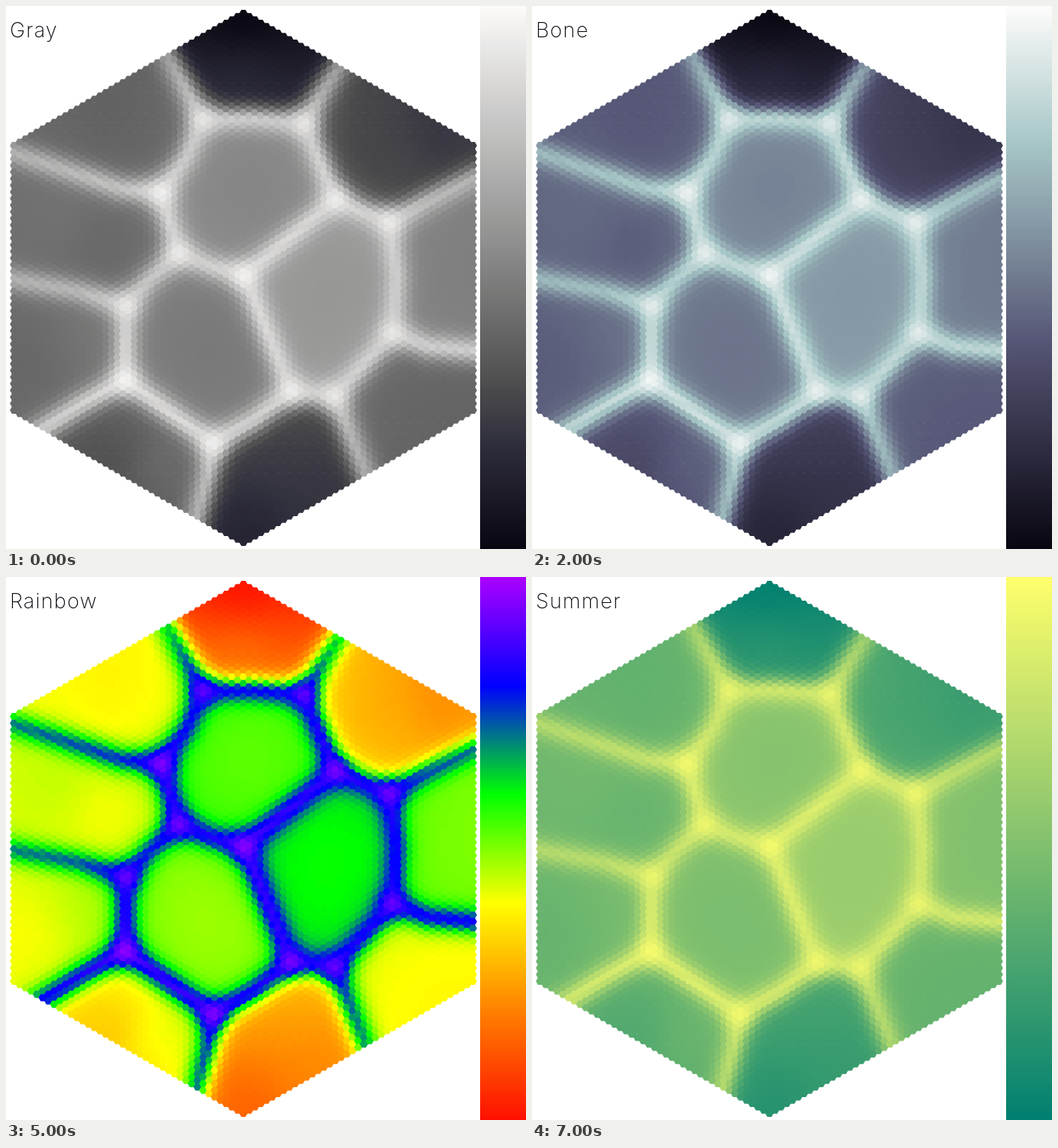
Animation, 680 px wide and 711 px high, one loop 8000 ms. Source, as an HTML page with a canvas:

```html
<!DOCTYPE html>
<html lang="en">
<head>
<meta charset="utf-8">
<title>Colour maps</title>
<style>
  html, body { margin: 0; width: 680px; height: 711px; overflow: hidden; background: #fff; }
  canvas, svg { position: absolute; left: 0; top: 0; display: block; }
  text { font: 200 27px Inter, "Open Sans", sans-serif; letter-spacing: 1.2px; fill: #0a0912; }
</style>
</head>
<body>
<canvas id="map" width="680" height="711"></canvas>
<svg width="680" height="711"><text id="label" x="5" y="41"></text></svg>
<script>
const STEP = 1000, SIDE = 40, R = 5, CX = 310.5, CY = 356;
const ctx = document.getElementById('map').getContext('2d');
const label = document.getElementById('label');

// Each map: name, then colour stops from low to high.
const MAPS = [
  ['Gray', [0, '08060f'], [0.18, '2c2b3a'], [0.3, '4c4c4e'], [0.4, '666666'], [1, 'fcfbfa']],
  ['Autumn', [0, 'ff0000'], [1, 'ffff00']],
  ['Bone', [0, '080610'], [0.375, '545474'], [0.75, 'a7c7c7'], [1, 'fdfcfb']],
  ['Jet', [0, '000080'], [0.125, '0000ff'], [0.375, '00ffff'], [0.625, 'ffff00'], [0.875, 'ff0000'], [1, '800000']],
  ['Winter', [0, '0000ff'], [1, '00ff80']],
  ['Rainbow', [0, 'ff1000'], [0.2, 'ff8000'], [0.4, 'ffff00'], [0.6, '00ff00'], [0.8, '0000ff'], [1, 'aa00ff']],
  ['Ocean', [0, '0a0910'], [0.1, '080818'], [0.2, '000033'], [0.333, '000055'], [0.667, '0080aa'], [1, 'fcfcfc']],
  ['Summer', [0, '008070'], [1, 'ffff6c']]
];

// Ridge points: x, y, height. Capitals are junctions.
const P = {
  B: [258, 149, .82], C: [390, 154, .82], D: [203, 245, .86], E: [226, 324, .84],
  F: [431, 254, .85], G: [502, 284, .84], H: [506, 428, .83], I: [430, 511, .83],
  J: [373, 504, .85], K: [312, 353, .87], L: [157, 393, .83], M: [156, 490, .88],
  N: [271, 573, .86],
  a: [204, 52, .6], b: [442, 70, .6], c: [416, 110, .68], d: [-2, 189, .7],
  e: [150, 239, .77], f: [622, 221, .7], g: [550, 257, .75], h: [622, 453, .82],
  i: [552, 446, .82], j: [475, 624, .67], k: [446, 550, .73], l: [246, 684, .68],
  m: [264, 615, .75], n: [40, 560, .82], o: [100, 521, .83], p: [-2, 356, .7],
  q: [95, 374, .73], r: [189, 358, .78], s: [511, 355, .82], t: [322, 148, .81],
  u: [236, 199, .8], v: [268, 341, .83], w: [325, 542, .83]
};
const PATHS = 'aB BtC Ccb BuD Ded DE CF FG Ggf GsH Hih HI Ikj IJ JK KF EvK ErL Lqp LM Mon MN NwJ Nml';
const ridges = PATHS.split(' ').map(w =>
  [...w].slice(1).map((c, i) => [P[w[i]], P[c]]));
const edges = ridges.flat();
const peaks = Object.keys(P).filter(k => k < 'a').map(k => P[k]);

// Levels inside the basins: x, y, value.
const LEVELS = [
  [310, 5, 0], [310, 105, .14], [490, 190, .26], [575, 165, .22], [440, 130, .28],
  [140, 150, .38], [60, 175, .4], [60, 270, .44], [148, 318, .39], [25, 475, .4],
  [110, 425, .44], [135, 595, .31], [205, 600, .4], [385, 580, .23], [310, 700, .14],
  [420, 640, .21], [535, 550, .39], [590, 350, .5], [320, 235, .52], [420, 380, .59],
  [260, 450, .47]
];

const side = (a, b, c) => (b[0] - a[0]) * (c[1] - a[1]) - (b[1] - a[1]) * (c[0] - a[0]);
const crosses = (a, b, c, d) =>
  side(a, b, c) * side(a, b, d) < 0 && side(c, d, a) * side(c, d, b) < 0;

function floorAt(p) {
  let sum = 0, total = 0, best = 1e9, near = 0;
  for (const q of LEVELS) {
    const d2 = (q[0] - p[0]) ** 2 + (q[1] - p[1]) ** 2;
    if (d2 < best) { best = d2; near = q[2]; }
    if (edges.some(([a, b]) => crosses(p, q, a, b))) continue;
    const w = 1 / (d2 + 600);
    sum += w * q[2];
    total += w;
  }
  return total ? sum / total : near;
}

// Distance to a ridge line and its height at the closest point.
function closest(ridge, x, y) {
  let dist = 1e9, height = 0;
  for (const [a, b] of ridge) {
    const dx = b[0] - a[0], dy = b[1] - a[1];
    const t = Math.max(0, Math.min(1, ((x - a[0]) * dx + (y - a[1]) * dy) / (dx * dx + dy * dy)));
    const d = Math.hypot(x - a[0] - t * dx, y - a[1] - t * dy);
    if (d < dist) { dist = d; height = a[2] + (b[2] - a[2]) * t; }
  }
  return [dist, height];
}

function valueAt(x, y) {
  const base = floorAt([x, y]);
  let gap = 1, sum = 0, total = 1e-9;
  for (const ridge of ridges) {
    const [d, h] = closest(ridge, x, y);
    const f = .9 * Math.exp(-((d / 16.5) ** 1.75)) + .1 * Math.exp(-d / 28);
    gap *= 1 - f;
    sum += f * h;
    total += f;
  }
  let v = base + (sum / total - base) * (1 - gap);
  for (const q of peaks) {
    const d = Math.hypot(x - q[0], y - q[1]);
    v += .09 * Math.exp(-((d / 13) ** 2));
  }
  return Math.max(0, Math.min(1, v));
}

const cells = [];
for (let k = -SIDE; k <= SIDE; k++) {
  const n = 2 * SIDE + 1 - Math.abs(k);
  for (let j = 0; j < n; j++) {
    const x = CX + 1.5 * R * k, y = CY + (j - (n - 1) / 2) * Math.sqrt(3) * R;
    cells.push([x, y, valueAt(x, y)]);
  }
}

const rgb = hex => [0, 2, 4].map(i => parseInt(hex.slice(i, i + 2), 16));

function shade(stops, v) {
  let i = 1;
  while (i < stops.length - 1 && v > stops[i][0]) i++;
  const [p, lo] = stops[i - 1], [q, hi] = stops[i];
  const a = rgb(lo), b = rgb(hi), t = (v - p) / (q - p);
  return `rgb(${a.map((c, n) => Math.round(c + (b[n] - c) * t))})`;
}

function hexagon(x, y, r) {
  ctx.beginPath();
  for (let i = 0; i < 6; i++) {
    const t = i * Math.PI / 3;
    ctx.lineTo(x + r * Math.cos(t), y + r * Math.sin(t));
  }
  ctx.fill();
}

function draw([name, ...stops]) {
  ctx.fillStyle = '#fff';
  ctx.fillRect(0, 0, 680, 711);
  const ramp = Array.from({ length: 256 }, (_, i) => shade(stops, i / 255));
  for (const [x, y, v] of cells) {
    ctx.fillStyle = ramp[Math.round(v * 255)];
    hexagon(x, y, R + .4);
  }
  for (let y = 0; y < 711; y++) {
    ctx.fillStyle = ramp[Math.round((1 - y / 710) * 255)];
    ctx.fillRect(620, y, 60, 1);
  }
  label.textContent = name;
}

let shown = -1;
const start = performance.now();
function tick() {
  const i = Math.floor((performance.now() - start) / STEP) % MAPS.length;
  if (i !== shown) draw(MAPS[shown = i]);
  requestAnimationFrame(tick);
}
tick();
</script>
</body>
</html>
```
